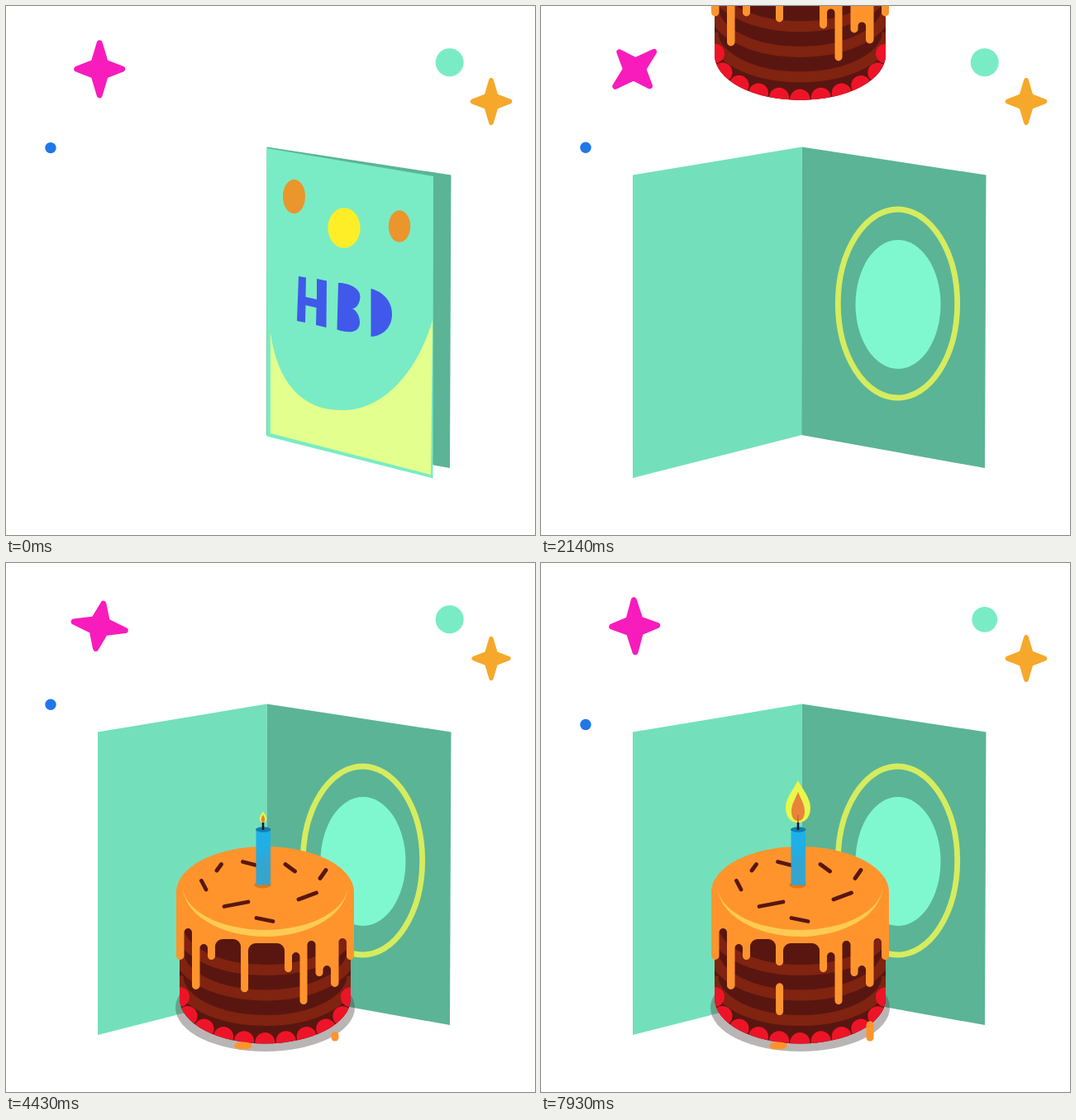
An HTML page for the animation above (8 s loop, 640x640 px).

```html
<!DOCTYPE html>
<html lang="en">
<head>
<meta charset="utf-8">
<title>Birthday card</title>
<style>
  html, body { margin: 0; width: 100%; height: 100%; overflow: hidden; background: #fff; }
  svg { display: block; width: 100%; height: 100%; }
</style>
</head>
<body>
<svg viewBox="0 0 640 640">
  <defs>
    <path id="star" stroke-width="7" stroke-linejoin="round"
      d="M0-31.5 7-8 27.5 0 7 8 0 31.5-7 8-27.5 0-7-8Z"/>
    <path id="body" d="M210 400V527A103.500 54.500 0 0 0 417 527V400Z"/>
    <clipPath id="bodyClip"><use href="#body"/></clipPath>
    <linearGradient id="wax" x2="0" y2="1">
      <stop offset=".3" stop-color="#1eb0e6"/><stop offset=".65" stop-color="#35a4cf"/>
    </linearGradient>
  </defs>

  <circle id="mint" r="17" fill="#79ecc5"/>
  <circle id="blue" cx="54" r="6.700" fill="#2077e8"/>
  <use id="pink" href="#star" fill="#f81cbc" stroke="#f81cbc"/>
  <use id="amber" href="#star" fill="#f6a82b" stroke="#f6a82b"/>

  <path d="M315.500 170.500 538.500 204.500 537 559 315 519Z" fill="#5bb496"/>
  <ellipse cx="431.500" cy="360" rx="72.200" ry="114" fill="none" stroke="#d6ec5f" stroke-width="6.800"/>
  <ellipse cx="432" cy="361" rx="51.500" ry="78" fill="#7ff8d0"/>

  <path id="inside" d="M315.500 170.500 517 204.500V571L315.500 519Z" fill="#73e0bb"/>
  <g id="cover">
    <path d="M315.500 172 517 206 516.500 571.500 315.500 520.500Z" fill="#79ecc5"/>
    <path d="M320 395C328 455 358 489 405 489C455 490 497 445 516 380L514 567 320 517Z" fill="#e3ff8d"/>
    <g fill="#eb952d">
      <ellipse cx="348.500" cy="230.500" rx="13.500" ry="20.700"/>
      <ellipse cx="476" cy="266.500" rx="13.200" ry="19.300"/>
    </g>
    <ellipse cx="409" cy="268.500" rx="19.600" ry="24.300" fill="#feee28"/>
    <g fill="#4059ea" role="img" aria-label="HBD">
      <path d="M354 327 363 328.500 362.500 352 376 355V330L388 332.500 387.500 389 375 386 375.500 365 362.500 362 362 383 352 381Z"/>
      <path d="M402 335C416 335 429 342 428.500 352C428 360 424 366 419 366C425 369 428.500 377 428 384C427 396 414 396 400.500 391.500Z"/>
      <path d="M441.500 342C458 346 467 359 467 373C467 388 457 399 441.500 400Z"/>
    </g>
  </g>

  <ellipse id="shadow" cx="313.500" cy="538" rx="108.500" ry="53" fill="#504646" fill-opacity=".4"/>
  <g id="cake">
    <use href="#body" fill="#591610"/>
    <g id="stripes" clip-path="url(#bodyClip)" fill="none" stroke="#802310" stroke-width="13"></g>
    <g id="beads" clip-path="url(#bodyClip)">
      <path d="M210 525A103.500 55 0 0 0 417 525" fill="none" stroke="#ee1428" stroke-width="24"
        stroke-linecap="round" pathLength="10.010" stroke-dasharray="0 1"/>
    </g>
    <path id="icing" fill="#ff942d"/>
    <path d="M213.500 390A100 62 0 0 0 413.500 390A100 54 0 0 1 213.500 390Z" fill="#ffcb52"/>
    <path stroke="#591610" stroke-width="4.800" stroke-linecap="round" d="M236.500 384.500 242 395M255 372 260.500 364.500
      M286.500 361.500 306 366.500M338 364.500 349.500 373M380 381.500 387 371.500M264 415.500 293 410M354 407 375.500 399M303 429.500 323 433.500"/>
  </g>
  <ellipse id="puddle" rx="11" ry="4.500" fill="#ff942d"/>
  <g stroke="#ff942d" stroke-width="9" stroke-linecap="round">
    <line id="dripA" x1="288.600" x2="288.600"/>
    <line id="dripB" x1="398" x2="398"/>
  </g>
  <g id="candle">
    <ellipse cx="310.500" cy="389.500" rx="10.300" ry="4" fill="#dc781f"/>
    <rect x="302.500" y="322" width="17.500" height="67.500" fill="url(#wax)"/>
    <ellipse cx="311.300" cy="322.500" rx="9.300" ry="3.300" fill="#117faf"/>
    <path d="M311 312.500V323" stroke="#1b1b2e" stroke-width="2.600"/>
  </g>
  <g id="flame">
    <path d="M0-51C5-41 15-30 15-18C15-7 9 0 0 0S-15-7-15-18C-15-30-5-41 0-51Z" fill="#e8f74a"/>
    <path d="M0-37C3-29 8-22 8-14C8-6 5-2 0-2S-8-6-8-14C-8-22-3-29 0-37Z" fill="#e8833a"/>
    <path d="M0-9V0" stroke="#d06a2e" stroke-width="2"/>
  </g>
</svg>
<script>
const LOOP = 8000, HINGE = 315.5;
const el = Object.fromEntries([...document.querySelectorAll('[id]')].map(e => [e.id, e]));
const set = (e, attrs) => { for (const k in attrs) e.setAttribute(k, attrs[k]); };
const show = (e, on) => { e.style.display = on ? '' : 'none'; };
const clamp = u => Math.min(1, Math.max(0, u));
const wave = u => (1 - Math.cos(2 * Math.PI * u)) / 2;
const ease = u => wave(clamp(u) / 2);

// Linear track through [time, value] steps
function track(t, steps) {
  const i = steps.findIndex(s => s[0] > t);
  if (i === 0) return steps[0][1];
  if (i < 0) return steps.at(-1)[1];
  const [a, b] = [steps[i - 1], steps[i]];
  return a[1] + (b[1] - a[1]) * (t - a[0]) / (b[0] - a[0]);
}

// Falls from off stage, dips below rest, rebounds and settles
function fall(t, start, land, height, dip) {
  if (t < land) return dip - (height + dip) * (1 - clamp((t - start) / (land - start)) ** 2);
  return track(t, [[land, dip], [land + 20, dip], [land + 90, 0], [land + 160, -dip / 2], [land + 280, 0]]);
}

// Alternating drips and gaps: [right edge, y]
function icingPath() {
  const edges = [[215.5, 480], [225, 442], [234.5, 516], [244, 461], [253, 480], [284, 455], [293, 487], [337, 460],
    [346, 495], [355.5, 471], [364.5, 534], [374.5, 457], [383.5, 500], [393, 487], [402.5, 513], [412, 454], [421, 480]];
  let x = 206, d = 'M206 398';
  edges.forEach(([right, y], i) => {
    const r = Math.min((right - x) / 2, 9), gap = i % 2, v = gap ? -r : r;
    d += `V${y - v}a${r} ${r} 0 0 ${gap} ${r} ${v}H${right - r}a${r} ${r} 0 0 ${gap} ${r} ${-v}`;
    x = right;
  });
  return d + 'V398A107.500 55 0 0 0 206 398Z';
}

set(el.icing, { d: icingPath() });
el.stripes.innerHTML = [438.5, 469, 499.5].map(y => `<path d="M208 ${y}A105.500 54 0 0 0 419 ${y}"/>`).join('');

function drip(line, t, first, top, bottom, head, tail) {
  const p = (t - first) % 1500, y = u => top + (bottom - top) * u;
  show(line, t >= first);
  if (t >= first) set(line, { y1: y(track(p, tail)), y2: y(track(p, head)) });
}

function draw(t) {
  const beat = t % 2400;
  const hop = beat < 810 ? Math.sin(Math.PI * beat / 810) : 0;
  set(el.blue, { cy: 171.3 + 80 * hop });
  set(el.mint, { transform: `translate(536.700 68.300) scale(${1 - 0.32 * hop})` });
  set(el.pink, { transform: `translate(113.200 76.300) rotate(${180 * t / LOOP})` });
  const twinkle = t > 3700 && t < 7700 ? wave((t - 3700) / 2000) : 0;
  set(el.amber, { transform: `translate(587 115.500) scale(${0.815 * (1 - 0.08 * twinkle)})` });

  const open = 1 - 2.015 * ease((t - 413) / 1557);
  const swing = `translate(${HINGE}) scale(${open} 1) translate(${-HINGE})`;
  set(el.cover, { transform: swing });
  set(el.inside, { transform: swing });
  show(el.cover, open > 0);
  show(el.inside, open <= 0);

  const drop = fall(t, 1850, 2480, 600, 20.5);
  set(el.cake, { transform: `translate(0 ${drop})` });
  set(el.beads, { transform: `translate(0 ${drop > 0 ? -0.41 * drop : 0})` });
  set(el.shadow, { opacity: clamp((t - 2250) / 230) });

  drip(el.dripA, t, 2600, 482, 578, [[0, 0], [330, .34], [830, .63], [1400, 1]],
    [[0, 0], [500, 0], [830, .32], [1500, 1]]);
  drip(el.dripB, t, 3000, 508, 574, [[0, 0], [350, 1]],
    [[0, 0], [100, 0], [430, .77], [1430, .96], [1500, 1]]);
  set(el.puddle, { transform: `translate(287 584) scale(${clamp((t - 4290) / 130)})` });

  set(el.candle, { transform: `translate(0 ${fall(t, 2650, 3150, 400, 6)})` });
  const lit = track(t, [[4300, 0], [4430, .28], [4900, 1]]);
  const flicker = 0.96 + 0.04 * Math.cos(2 * Math.PI * (t - 7930) / 800);
  set(el.flame, { transform: `translate(311 314) scale(${lit} ${lit * flicker})` });
}

const began = performance.now();
function tick() {
  draw((performance.now() - began) % LOOP);
  requestAnimationFrame(tick);
}
tick();
</script>
</body>
</html>
```
